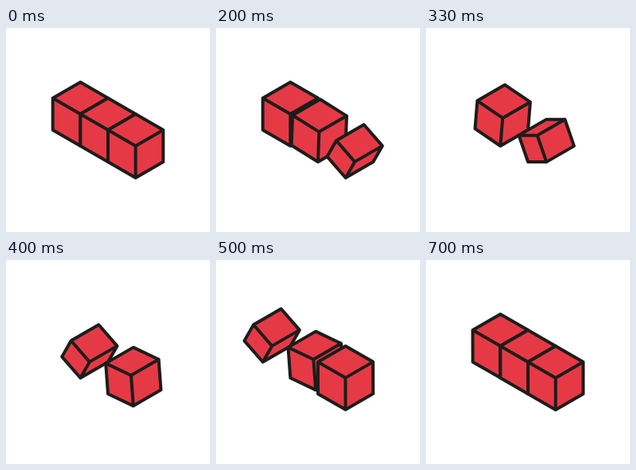
Animation, 256 px wide and 256 px high, one loop 0.73 s. Source, as an HTML page:

```html
<!DOCTYPE html>
<html lang="en">
<head>
<meta charset="utf-8">
<title>Tumbling cubes</title>
<style>
  html, body { margin: 0; width: 100%; height: 100%; overflow: hidden; background: #fff; }
  svg { display: block; width: 100vw; height: 100vh; }
  path { fill: #e63946; stroke: #1d1d1b; stroke-width: 4; stroke-linejoin: round; }
</style>
</head>
<body>
<svg viewBox="0 0 256 256"></svg>
<script>
const LOOP = 730, TICK = 100 / 3;   // loop in ms, one step of the 30 fps clock
const ROLL = 13, STAGGER = 3;       // in steps
const EDGE = 40, DX = EDGE * Math.cos(Math.PI / 6), DY = EDGE / 2;
const LAST = 2;

const svg = document.querySelector('svg');
const cubes = [-1, 0, 1, 2].map(slot => {
  const path = document.createElementNS('http://www.w3.org/2000/svg', 'path');
  svg.append(path);
  return { slot, path };
});

// Symmetric cubic Bezier easing with handles (0.8, 0) and (0.2, 1)
function ease(x) {
  if (x <= 0) return 0;
  if (x >= 1) return 1;
  let lo = 0, hi = 1, s;
  for (let i = 0; i < 24; i++) {
    s = (lo + hi) / 2;
    const r = 1 - s;
    if (2.4 * s * r * r + 0.6 * s * s * r + s * s * s < x) lo = s; else hi = s;
  }
  return s * s * (3 - 2 * s);
}

// u runs along the row, w points up
const project = ([u, w]) => [128 - 2 * DX + u * DX, 128 + u * DY - w * EDGE];
const back = ([x, y]) => [x + DX, y - DY];
const area = pts => pts.reduce((sum, [x, y], i) => {
  const [nx, ny] = pts[(i + 1) % pts.length];
  return sum + x * ny - nx * y;
}, 0);
const outline = pts => 'M' + pts.map(p => p.map(n => n.toFixed(2)).join(' ')).join('L') + 'Z';

// Each corner slides straight to its place after a quarter turn
function cubePath(slot, t) {
  const front = [
    [slot + t, t],
    [slot + 2 * t, 1],
    [slot + 1 + t, 1 - t],
    [slot + 1, 0]
  ].map(project);
  const sides = front.map((p, i) => {
    const q = front[(i + 1) % 4];
    return [p, back(p), back(q), q];
  });
  return [...sides.filter(side => area(side) > 0.01), front].map(outline).join('');
}

function draw(ms) {
  const step = Math.floor((ms % LOOP + 4) / TICK);
  for (const { slot, path } of cubes) {
    const local = step - (LAST - slot) * STAGGER;
    const t = ease(local / ROLL);
    const shown = slot === LAST ? t < 0.5 : slot >= 0 || local >= 6;
    path.setAttribute('d', shown ? cubePath(slot, t) : '');
  }
}

const start = performance.now();
function loop() {
  draw(performance.now() - start);
  requestAnimationFrame(loop);
}
loop();
</script>
</body>
</html>
```
